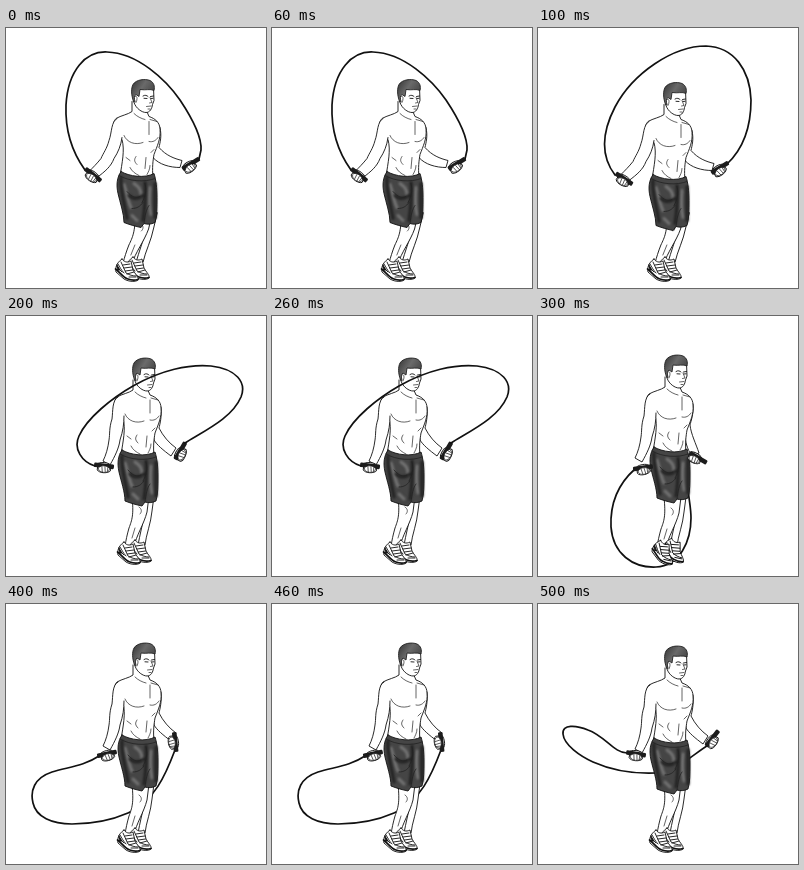
Animation of 260 by 260 pixels, one loop 600 ms. Source, as an HTML page:

```html
<!DOCTYPE html>
<html>
<head>
<meta charset="utf-8">
<style>
html, body { margin: 0; width: 100%; height: 100%; overflow: hidden; background: #fff; }
svg { display: block; width: 100vw; height: 100vh; }
.ink { fill: none; stroke: #111; stroke-width: .9; stroke-linecap: round; stroke-linejoin: round; }
.skin { fill: #fff; }
.rope { stroke-width: 1.7; }
.cloth { fill: #454545; }
.hair { fill: url(#hair); stroke: #222; }
.shade, .glow { stroke: #222; stroke-width: 3; filter: blur(1.1px); }
.glow { stroke: #747474; }
.fold { stroke: #222; stroke-width: .8; }
.thin { stroke-width: .65; }
.black { fill: #1c1c1c; }
</style>
</head>
<body>
<svg viewBox="0 0 260 260">
  <defs>
    <linearGradient id="hair" x2="1" y2=".6">
      <stop offset="0" stop-color="#333"/><stop offset=".5" stop-color="#6a6a6a"/><stop offset="1" stop-color="#444"/>
    </linearGradient>
  </defs>
  <g id="stage"></g>
</svg>
<script>
const line = (d, cls = '') => `<path class="ink ${cls}" d="${d}"/>`;
const group = (t, s) => `<g transform="${t}">${s}</g>`;
const move = (x, y, s) => group(`translate(${x} ${y})`, s);

const torso =
  line('M127 64L127 74C123 77 116 78 111 81C106 86 109 95 117 102C120 113 117 125 115 139L148 140C147 130 148 123 149 117C152 109 156 101 155 92C155 85 150 81 144 79L141 72', 'skin') +
  line('M129 76C132 79 136 81 140 82M145 82L152 84M144 84L144 97M119 98C122 105 130 108 138 105M144 104C148 105 151 103 153 100', 'thin') +
  line('M121 120l4 3M131 119C129 122 129 124 132 127M141 120L140 131M125 130C127 134 130 136 134 138M145 128C145 132 143 135 142 137M149 112l-3 3', 'thin');

const head =
  line('M128 54L129 65C131 71 137 75 141 75C145 75 147 71 147.500 67L149 63L148.500 50L140 48Z', 'skin') +
  line('M128.500 64C126 57 126 51 128 47C131 42 140 41 145 43C149 45 150 49 149 53C145 51 141 53 135 52L134 59L131 57C129 58 129 61 130 64Z', 'hair') +
  line('M130 59C132 57.500 133 61 131 65', 'thin') +
  line('M138 58.500C140 57 142 58 143 59M145.500 59L148.500 58.500M139 60.800l3 .2M146 61l2 -.2') +
  line('M145 60L147 65L144.500 65.500M141.500 69L146 68.500M143 71.500l2 0', 'thin');

const shortsShape = 'M116 134C124 139 140 141 149 136C151 142 152 151 152 160C152 170 152 178 150 185C146 187 142 187 139 186L136 190C131 189 124 187 119 185C119 176 115 165 113 156C111 147 112 140 116 134Z';
const shorts =
  line(shortsShape, 'cloth') +
  line('M119 147C122 156 123 164 126 170M127 178L132 183M145 150C144 160 144 168 146 177M129 146C133 149 136 151 136 158', 'glow') +
  line('M140 145C141 156 140 168 138 183M116 140C115 152 119 164 122 181M150 146L150 180M124 158C129 163 134 161 138 158', 'shade') +
  line('M114 138C124 144 140 145 150 141M140 146C142 153 140 160 137 165M122 154C127 160 131 161 135 159M127 171C132 171 135 169 138 165M139 186C140 178 141 172 144 168', 'fold');

const legs =
  line('M139 180C140 198 136 208 132 229L139 229C140 219 145 207 146 195L148 180Z', 'skin') +
  line('M126 180C128 199 126 204 123 212C121 219 120 224 119 230L128 231C130 220 138 208 141 196L143 180Z', 'skin') +
  line('M133 191C136 193 136 196 134 198M129 212L126 222', 'thin');

const shoe =
  line('M118 226C112 230 111 236 112 239L120 246C125 249 132 249 134 247C135 244 131 241 129 237L127 228C123 230 120 229 118 226Z', 'skin') +
  line('M111.500 236C116 239 119 245 124 246C128 247.500 132 247 134 246.500', 'rope') +
  line('M114 231C116 234 117 237 120 240M117 229L122 240C125 242 129 243 132 243M119 232l7 -1M120 235l8 -1M121.500 238l7 -1M123 241l7 -2M113 234l5 5M125 244l7 0') +
  line('M113 232L116 237L114 237Z', 'black');

// handle held across a closed hand; shift slides the hand along it
const fist = (x, y, turn, shift = 0) => group(`translate(${x} ${y}) rotate(${turn})`,
  move(shift, 2, line('M-6 -4C-3 -6 4 -6 6 -4L7 2C5 5 -4 6 -6 3Z', 'skin')) +
  '<rect class="black" x="-10" y="-2.500" width="20" height="4.600" rx="1.200"/>' +
  move(shift, 2, line('M-5 0C-2 -3 3 -3 6 0L5 3C2 5 -4 5 -5 2Z', 'skin thin') +
    line('M-2 -1L-1 4M1 -1.500L2 4M4 -1L4 3', 'thin')));

const nearOut = 'M112 81C106 84 107 95 104 103C102 111 98 116 96 121C92 126 88 130 84 134L92 140C100 134 106 129 109 121C113 115 116 108 117 100';
const farOut = 'M155 90C157 99 155 105 154 110C161 118 169 121 177 123L175 130C165 130 154 127 148 120C147 115 148 109 150 104';
const nearDown = 'M112 81C106 84 107 95 106 103C103 112 104 118 103 124C102 132 100 139 97 145L104 149C109 140 113 132 114 124C117 115 118 108 118 100';
const farBent = 'M155 91C156 100 154 108 153 112C157 120 163 127 170 132L165 140C157 134 151 129 148 124C147 118 148 112 150 106';
const farDown = 'M155 91C156 100 153 108 152 112C153 121 158 131 161 140L154 143C149 136 147 128 147 121C147 115 148 112 150 106';

// body and feet offsets, arms, grips [x, y, turn, shift], rope
const poses = [
  { body: [-1, 9.5], foot: [-2, 5], bend: -6, near: nearOut, far: farOut,
    grips: [[87, 147, 38], [185, 136, -32, -3]],
    rope: 'M79 142C66 124 59 103 60 77C62 42 80 23 101 24C132 25 160 52 174 72C186 90 196 108 195 122L193 131' },
  { body: [-1, 12.5], foot: [-2, 5], bend: -6, near: nearOut, far: farOut,
    grips: [[86, 151, 33], [182, 140, -32, -2]],
    rope: 'M77 147C64 130 62 108 77 79C95 45 135 18 168 18C196 19 212 42 213 72C213 98 205 121 189 136' },
  { body: [0, 0], foot: [0, 0], near: nearDown, far: farBent, over: true,
    grips: [[98, 150, 7], [174.5, 135, -60, -3]],
    rope: 'M89 150C76 146 67 133 73 120C81 102 106 82 127 70C155 54 183 48 205 50C230 53 241 66 235 81C226 102 200 114 179 127' },
  { body: [0, -3], foot: [0, 1], tip: 12, near: nearDown, far: farDown,
    grips: [[105, 152, -8], [160, 142, 30, -3]],
    rope: 'M97 153C80 168 72 188 73 211C75 238 95 252 118 251C142 250 153 225 153 202C153 190 150 180 150 170' },
  { body: [0, -3], foot: [0, 0], near: nearDown, far: farBent,
    grips: [[101, 150, -12], [169, 138, 84]],
    rope: 'M93 152C78 162 62 163 46 168C28 174 24 187 27 199C30 213 46 220 66 220C88 220 106 216 122 209C148 198 160 170 169 146' },
  { body: [0, 0], foot: [0, 0], near: nearDown, far: farBent,
    grips: [[98, 150, 9], [174.5, 134.5, -52, -3]],
    rope: 'M89 149C76 149 67 132 50 126C38 121 24 120 25 130C26 141 42 152 55 158C73 166 95 170 118 169C140 167 155 150 172 140' }
];

function draw(p) {
  const [x, y] = p.body, [fx, fy] = p.foot, bend = p.bend || 0;
  const rope = line(p.rope, 'rope');
  const foot = group(`rotate(${p.tip || 0} 133 247)`, shoe);
  const lean = -230 * Math.tan(bend * Math.PI / 180);
  return (p.over ? '' : rope) +
    move(fx, fy, group(`translate(${lean} 0) skewX(${bend})`, legs) + move(11, -2, foot) + foot) +
    move(x, y, line(p.far, 'skin') + torso + shorts + head + line(p.near, 'skin')) +
    p.grips.map(g => fist(...g)).join('') +
    (p.over ? rope : '');
}

const stage = document.getElementById('stage');
const views = poses.map(draw);
const start = performance.now();
let shown = -1;
function tick(now) {
  const i = Math.floor(Math.max(0, now - start) / 100) % views.length;
  if (i !== shown) stage.innerHTML = views[shown = i];
  requestAnimationFrame(tick);
}
tick(start);
</script>
</body>
</html>
```
